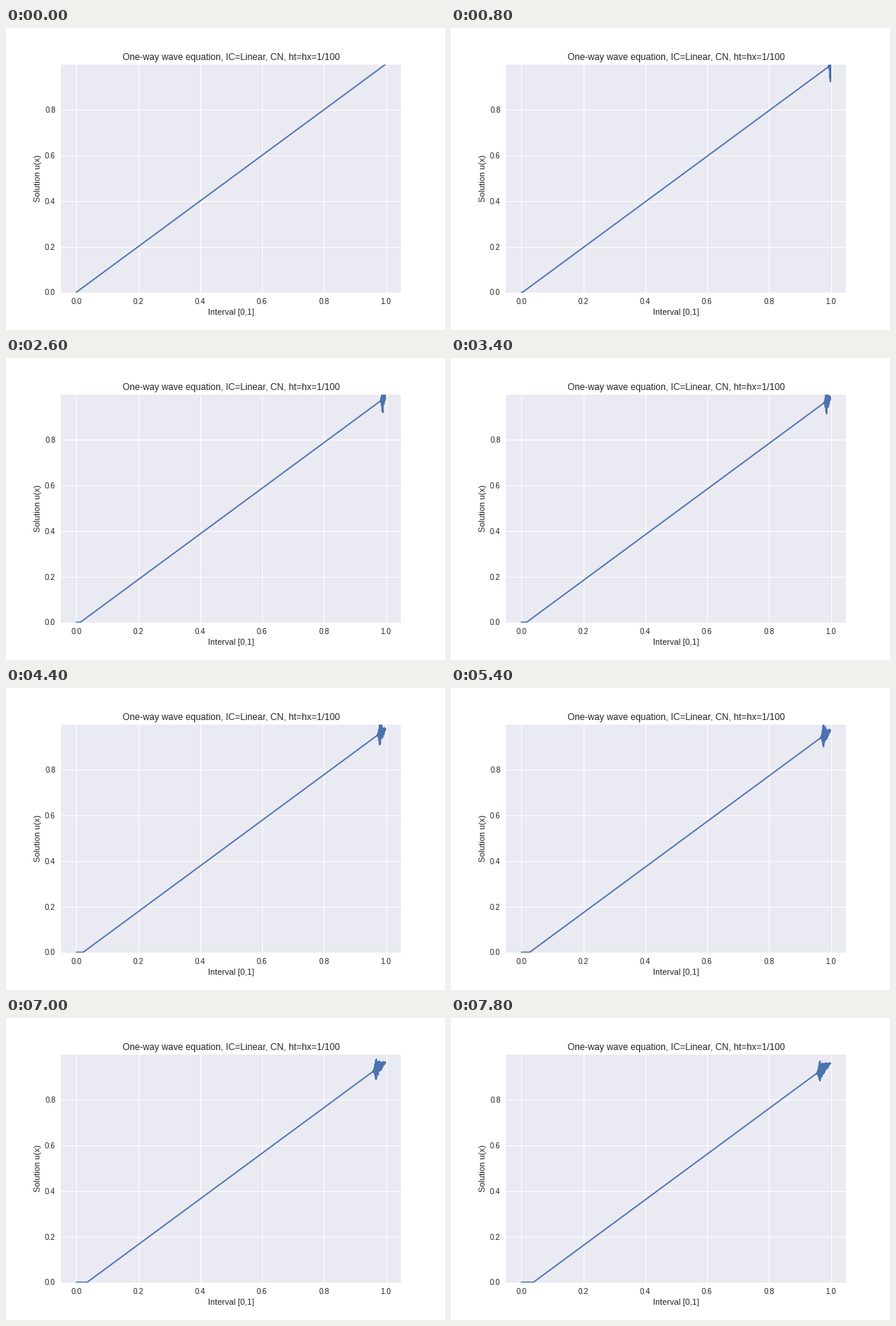
A matplotlib script that plays this animation: 576 px wide and 396 px high, repeating every 8 s.

```python
import numpy as np
import matplotlib.pyplot as plt
from matplotlib.animation import FuncAnimation

STEPS = 40
H = 0.001          # space step and time step
TAIL = 200         # nodes near the outflow end that can ripple
RIPPLE = 0.043     # ripple height at the last step

INK = "0.15"
plt.rcParams.update({
    "font.family": "Liberation Sans",
    "text.color": INK,
    "axes.labelcolor": INK,
    "xtick.color": INK,
    "ytick.color": INK,
})


def ripples():
    """Crank-Nicolson response to a kick at the right end, one row per step."""
    adv = 0.25 * (np.eye(TAIL, k=1) - np.eye(TAIL, k=-1))
    inv = np.linalg.inv(np.eye(TAIL) + adv)
    step = inv @ (np.eye(TAIL) - adv)
    kick = np.zeros(TAIL)
    kick[-1] = 1.0
    rows = [np.zeros(TAIL), inv @ kick]
    while len(rows) < STEPS:
        rows.append(step @ rows[-1])
    rows = np.array(rows)
    return rows * RIPPLE / np.abs(rows[-1]).max()


x = np.arange(1000) * H
wave = ripples()


def solution(n):
    u = np.maximum(x - n * H, 0)
    u[-TAIL:] += wave[n]
    return u


fig = plt.figure(figsize=(8, 5.5), dpi=72, facecolor="white")
ax = fig.add_axes([0.125, 0.125, 0.775, 0.755], facecolor="#EAEAF2")
for spine in ax.spines.values():
    spine.set_visible(False)

ax.set_axisbelow(True)
ax.grid(True, color="white", linewidth=1, linestyle="-")
ax.tick_params(length=0, pad=7, labelsize=10)
ax.set_xlim(-0.05 * x[-1], 1.05 * x[-1])
ax.set_ylim(0, x[-1])
ax.set_xticks(np.arange(6) * 0.2)
ax.set_yticks(np.arange(5) * 0.2)
ax.set_title("One-way wave equation, IC=Linear, CN, ht=hx=1/100",
             fontsize=12, pad=6)
ax.set_xlabel("Interval [0,1]", fontsize=11, labelpad=4)
ax.set_ylabel("Solution u(x)", fontsize=11, labelpad=4)

line, = ax.plot(x, solution(0), color="#4C72B0", linewidth=1.75,
                solid_capstyle="round")


def draw(n):
    line.set_ydata(solution(n))
    return line,


anim = FuncAnimation(fig, draw, frames=STEPS, interval=200,
                     repeat=True, repeat_delay=0, blit=False)
plt.show()
```
